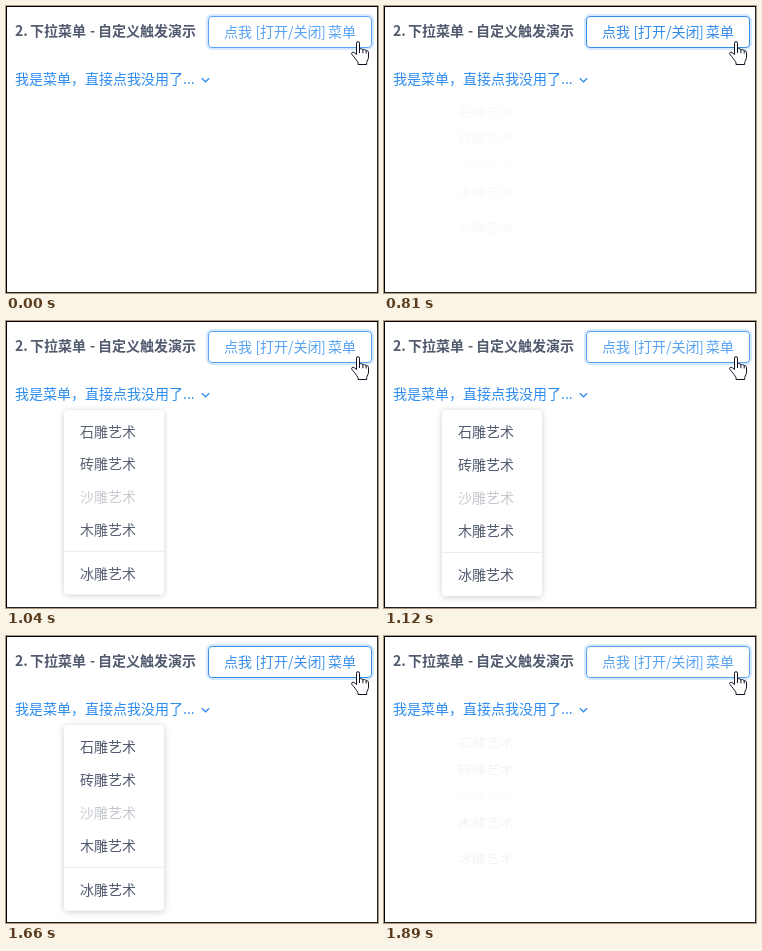
Recreate the animation shown at these times as an HTML page. Size 372 by 287 pixels, loop 2460 ms.

```html
<!DOCTYPE html>
<html lang="zh-CN">
<head>
<meta charset="utf-8">
<title>下拉菜单</title>
<style>
  html, body { margin: 0; width: 100%; height: 100%; overflow: hidden; background: #fff; }
  svg { display: block; width: 372px; height: 287px; font: 14px "Noto Sans CJK SC", "Noto Sans CJK", "Noto Sans", sans-serif; }
  .title { font-weight: 700; fill: #515a6e; }
  .link { fill: #2d8cf0; }
  .panel { fill: #fff; filter: drop-shadow(0 1px 3px rgba(0, 0, 0, .2)); }
  #menu { transform-origin: 108px 89px; fill: #515a6e; }
  #menu .disabled { fill: #c5c8ce; }
</style>
</head>
<body>
<svg viewBox="0 0 372 287">
  <rect x=".5" y=".5" width="371" height="286" fill="#fff" stroke="#000"/>
  <path d="M371.5 1V286.5H1" fill="none" stroke="#222"/>

  <g class="title">
    <text x="9" y="30">2.</text><text x="24" y="30">下拉菜单</text>
    <text x="84" y="30">-</text><text x="92" y="30">自定义触发演示</text>
  </g>

  <rect x="201" y="9" width="166" height="34" rx="5" fill="none" stroke="#2d8cf0" stroke-opacity=".2" stroke-width="2"/>
  <g id="button">
    <rect x="202.5" y="10.5" width="163" height="31" rx="3.5" fill="#fff" stroke="currentColor"/>
    <g fill="currentColor">
      <text x="218" y="31">点我</text><text x="249.5" y="31">[</text>
      <text x="254" y="31">打开</text><text x="282" y="31">/</text>
      <text x="287.5" y="31">关闭</text><text x="315" y="31">]</text>
      <text x="322" y="31">菜单</text>
    </g>
  </g>

  <g class="link">
    <text x="9" y="78">我是菜单，直接点我没用了</text><text x="177" y="78">...</text>
    <path d="M195.8 72.3l3.7 3.5 3.7-3.5" fill="none" stroke="#2d8cf0" stroke-width="1.2"/>
  </g>

  <g id="menu" opacity="0">
    <rect class="panel" x="58" y="89" width="100" height="186" rx="4"/>
    <rect x="58" y="231" width="100" height="1" fill="#e8eaec"/>
    <text x="74" y="116">石雕艺术</text>
    <text x="74" y="149">砖雕艺术</text>
    <text x="74" y="182" class="disabled">沙雕艺术</text>
    <text x="74" y="215">木雕艺术</text>
    <text x="74" y="259">冰雕艺术</text>
  </g>

  <circle id="press" cx="351" cy="35" r="12" fill="#ff0" opacity="0"/>
  <g transform="translate(345 35)" fill="#fff" stroke="#112" stroke-linejoin="round">
    <path d="M5.5 13.5V2.2a1.5 1.5 0 0 1 3 0V8.2c.6-.9 3.1-.8 3.4.8 .6-.8 2.9-.6 3.3.9 1-.5 2.3.1 2.3 1.6V16c0 2.5-1.4 3.5-1.8 5.5v2H7v-2C5.5 19 3.5 16.5 1 13.5 -.2 11.8 1.8 10.4 3.2 11.6Z"/>
    <path d="M8.5 8v4M11.9 9v3.2M15.2 9.9v2.6" fill="none"/>
  </g>
</svg>
<script>
  const LOOP = 2460;
  const STEPS = [0, 580, 660, 740, 810, 880, 960, 1040, 1120, 1500, 1580, 1650, 1730, 1810, 1890];
  const PRESSES = [[580, 777], [1500, 1637]];
  const OPEN = 777, CLOSE = 1637, DROP = 300, FADE = 200;
  const REST = [87, 163, 243], ACTIVE = [43, 133, 228];

  const [button, menu, press] = ["button", "menu", "press"].map(id => document.getElementById(id));
  const clamp = v => Math.min(1, Math.max(0, v));
  const ease = v => v * v * (3 - 2 * v);
  const progress = (t, start, length) => clamp((t - start) / length);

  // The button darkens while held and recovers after release.
  function pressDepth(t) {
    return PRESSES.reduce((depth, [down, up]) =>
      depth + progress(Math.min(t, up), down, FADE) * (1 - progress(t, up, FADE)), 0);
  }

  function draw(t) {
    const shown = ease(progress(t, OPEN, DROP)) - ease(progress(t, CLOSE, DROP));
    menu.setAttribute("opacity", shown);
    menu.style.transform = `scaleY(${0.8 + 0.2 * shown})`;

    const depth = pressDepth(t);
    button.style.color = `rgb(${REST.map((c, i) => c + (ACTIVE[i] - c) * depth)})`;

    const held = PRESSES.some(([down, up]) => t >= down && t < up);
    press.setAttribute("opacity", held ? 0.55 : 0);
  }

  const start = performance.now();
  function tick() {
    const time = (performance.now() - start) % LOOP;
    draw(STEPS.findLast(step => step <= time));
    requestAnimationFrame(tick);
  }
  tick();
</script>
</body>
</html>
```
